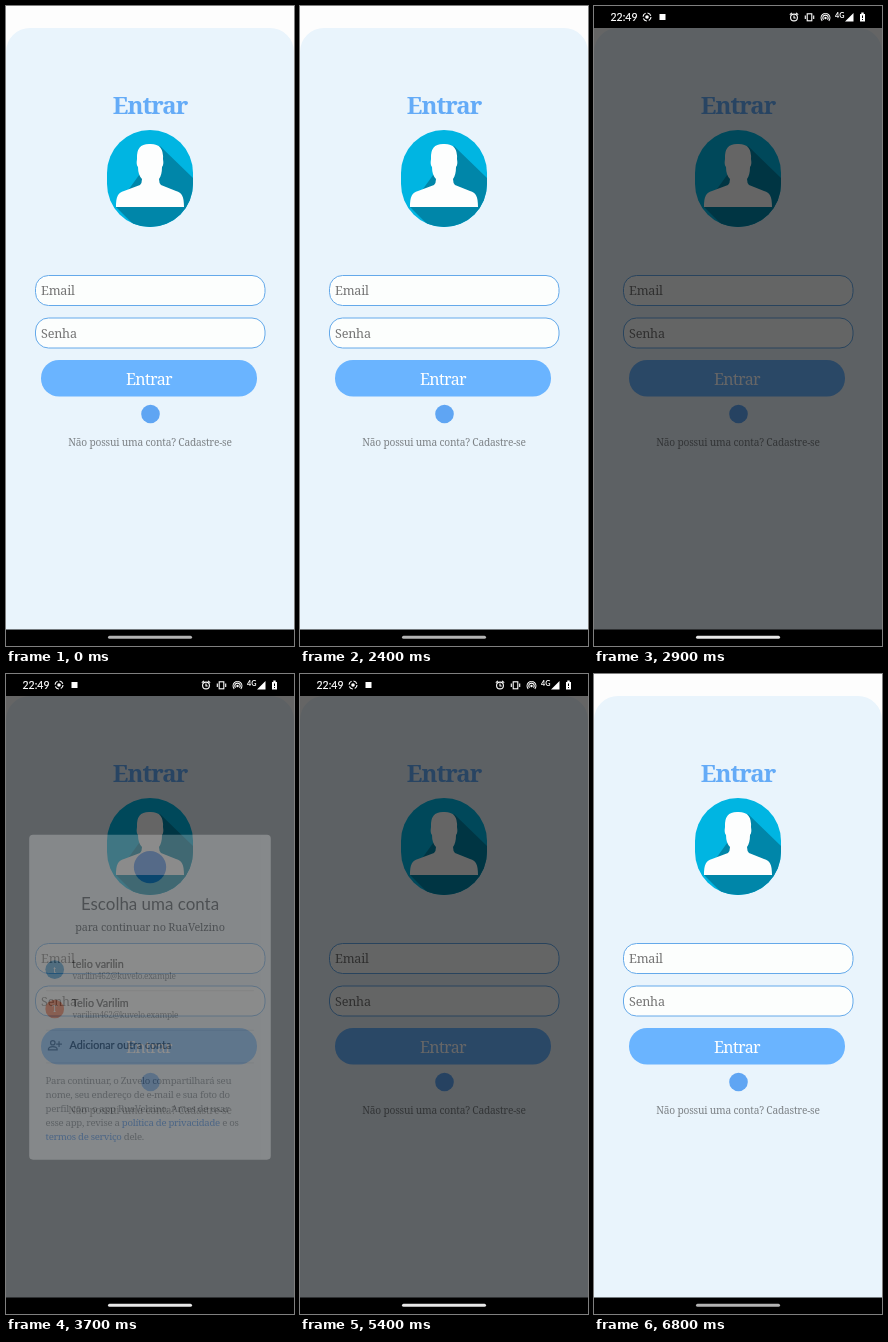
An HTML page that plays this animation: 288x640 px, repeating every 8000 ms.

```html
<!DOCTYPE html>
<html lang="pt-BR">
<head>
<meta charset="utf-8">
<title>Entrar</title>
<style>
  html, body { margin: 0; width: 100%; height: 100%; overflow: hidden; background: #fdfdfd; }
  svg { display: block; width: 288px; height: 640px; }
  .slab { font-family: "Noto Serif", serif; }
  .sans { font-family: Lato, sans-serif; }
  .mid { text-anchor: middle; }
  .title { font-size: 24px; font-weight: 700; letter-spacing: -1px; fill: #64abf7; }
  .label { font-size: 12.6px; letter-spacing: -.2px; fill: #757575; }
  .button { font-size: 16px; letter-spacing: -.6px; fill: #fff; }
  .signup { font-size: 10.2px; letter-spacing: -.2px; fill: #7d8286; }
  .head { font-size: 17.6px; fill: #202124; }
  .sub { font-size: 11.3px; letter-spacing: -.2px; fill: #202124; }
  .name { font-size: 11.2px; fill: #202124; stroke: #202124; stroke-width: .25px; }
  .mail { font-size: 8.6px; letter-spacing: -.3px; fill: #5f6368; }
  .body { font-size: 10px; letter-spacing: -.3px; fill: #5f6368; }
  .link { fill: #1a73e8; }
</style>
</head>
<body>
<svg viewBox="0 0 288 640">
  <defs>
    <clipPath id="badge"><rect x="101" y="124" width="86" height="97" rx="43"/></clipPath>
  </defs>

  <rect width="288" height="640" fill="#fdfdfd"/>
  <path d="M0 624V46A24 24 0 0 1 24 22H264A24 24 0 0 1 288 46V624Z" fill="#e9f4fc"/>

  <text class="slab mid title" x="144" y="108">Entrar</text>

  <g clip-path="url(#badge)">
    <rect x="101" y="124" width="86" height="97" fill="#00b5e2"/>
    <path d="M154 140L190 175V224H133L110 201Z" fill="#0086a9"/>
    <path d="M110 201C110 190 112 187 118 185L134 179Q136 177 136 173Q132 169 132 161Q130 159 131 153
      Q130 138 143 138Q158 137 157 153Q158 159 156 161Q156 169 153 173Q153 177 155 179L170 185C176 187 178 190 178 201Z" fill="#fdfefe"/>
  </g>

  <g fill="#fcfefd" stroke="#64a9ea">
    <rect x="29.5" y="269.5" width="229.5" height="30" rx="13"/>
    <rect x="29.5" y="312" width="229.5" height="30" rx="13"/>
  </g>
  <text class="slab label" x="35" y="289">Email</text>
  <text class="slab label" x="35" y="331.5">Senha</text>

  <rect x="35" y="354" width="216" height="36.5" rx="18" fill="#6ab4ff"/>
  <text class="slab mid button" x="143" y="378.5">Entrar</text>
  <circle cx="144.5" cy="408" r="9.3" fill="#5fa5f3"/>
  <text class="slab mid signup" x="144" y="440">Não possui uma conta? Cadastre-se</text>

  <rect id="dim" y="22" width="288" height="602" opacity="0"/>

  <g id="dialog" opacity="0">
    <rect x="18.5" y="154.5" width="251" height="337.5" rx="4" fill="#fdfefd"/>
    <circle cx="144" cy="188" r="16.8" fill="#2879ef"/>
    <text class="sans mid head" x="144" y="233">Escolha uma conta</text>
    <text class="slab mid sub" x="144" y="254.5">para continuar no RuaVelzino</text>
    <g id="accounts"></g>
    <path d="M36 316.5H252M36 357.5H252M36 391.5H252" stroke="#dcdedf"/>
    <g fill="none" stroke="#5f6368" stroke-width="1.3">
      <circle cx="43" cy="370.5" r="2.3"/>
      <path d="M38.5 378V377Q39 374.5 43 374.5T47.5 377V378ZM49.5 369V375M46.5 372H52.5"/>
    </g>
    <text class="sans name" x="60.5" y="377">Adicionar outra conta</text>
    <g class="slab body">
      <text x="35.5" y="413">Para continuar, o Zuvelo compartilhará seu</text>
      <text x="35.5" y="427.7">nome, seu endereço de e-mail e sua foto do</text>
      <text x="35.5" y="442.4">perfil com o app RuaVelzino. Antes de usar</text>
      <text x="35.5" y="457.1">esse app, revise a <tspan class="link">política de privacidade</tspan> e os</text>
      <text x="35.5" y="471.8"><tspan class="link">termos de serviço</tspan> dele.</text>
    </g>
  </g>

  <g id="status" visibility="hidden">
    <rect width="288" height="22"/>
    <g fill="#fff">
      <text class="sans" x="16.5" y="15" font-size="10.5" stroke="#fff" stroke-width=".2">22:49</text>
      <circle cx="53" cy="11" r="1.8"/>
      <rect x="65.5" y="8" width="6" height="6"/>
      <circle cx="231.5" cy="12" r="1.2"/>
      <text class="sans" x="241" y="11.5" font-size="7.2" font-weight="700">4G</text>
      <path d="M251 15.5L259.5 7V15.5ZM266 8H267.3V6.5H269.7V8H271V15.5H266Z"/>
    </g>
    <path d="M268.5 9.5V12M268.5 13V14" stroke="#000"/>
    <g fill="none" stroke="#fff" stroke-width="1.1">
      <circle cx="53" cy="11" r="4" stroke-dasharray="4.3 2"/>
      <circle cx="200" cy="11.5" r="3.4"/>
      <path d="M200 9.5V12H201.7M195.8 8.7L198 6.8M204.2 8.7L202 6.8"/>
      <rect x="213.2" y="7.8" width="4.6" height="7"/>
      <path d="M211.3 9.5V13M219.7 9.5V13"/>
      <path d="M229.6 13.7A2.7 2.7 0 1 1 233.4 13.7M228.2 14.8A4.4 4.4 0 1 1 234.8 14.8"/>
    </g>
  </g>

  <rect y="623.5" width="288" height="16.5"/>
  <rect id="handle" x="102" y="629.7" width="84" height="3" rx="1.5" fill="#b4b4b4"/>
</svg>
<script>
  const LOOP = 8000, TICK = 100;
  const $ = id => document.getElementById(id);
  const [dim, dialog, status, handle] = ['dim', 'dialog', 'status', 'handle'].map($);

  const account = (y, color, name, mail) => `
    <circle cx="45" cy="${y}" r="9.7" fill="${color}"/>
    <text class="slab mid" x="45" y="${y + 3.2}" font-size="9" fill="#fff">${name[0]}</text>
    <text class="sans name" x="63" y="${y - 2}">${name}</text>
    <text class="slab mail" x="63.5" y="${y + 9.5}">${mail}</text>`;
  $('accounts').innerHTML =
    account(294.5, '#1686cf', 'telio varilin', 'varilin462@kuvelo.example') +
    account(335.5, '#f4511e', 'Telio Varilim', 'varilim462@kuvelo.example');

  // [time, value] steps, linear in between
  const dimKeys = [[2600, 0], [2700, .11], [2800, .38], [2900, .6], [6000, .6], [6100, .52], [6200, .32], [6300, .12], [6400, 0]];
  const cardKeys = [[3600, 0], [3700, .25], [3800, .7], [3900, .95], [4000, 1], [5100, 1], [5200, .65], [5300, .2], [5400, 0]];

  function valueAt(keys, t) {
    const i = keys.findIndex(k => k[0] > t);
    if (i < 0) return keys[keys.length - 1][1];
    if (i === 0) return keys[0][1];
    const [t0, a] = keys[i - 1], [t1, b] = keys[i];
    return a + (b - a) * (t - t0) / (t1 - t0);
  }

  function draw(now) {
    // the screen refreshes ten times a second
    const t = Math.floor(now % LOOP / TICK) * TICK;
    const show = valueAt(cardKeys, t);
    const scale = t < 4000 ? .95 + .05 * show : 1;
    const dark = t >= 2700 && t < 6200;
    dim.setAttribute('opacity', valueAt(dimKeys, t));
    dialog.setAttribute('opacity', show);
    dialog.setAttribute('transform', `translate(144 323) scale(${scale}) translate(-144 -323)`);
    status.setAttribute('visibility', dark ? 'visible' : 'hidden');
    handle.setAttribute('fill', dark ? '#e8e8e8' : '#b4b4b4');
  }

  let start;
  function frame(now) {
    start ??= now;
    draw(now - start);
    requestAnimationFrame(frame);
  }
  draw(0);
  requestAnimationFrame(frame);
</script>
</body>
</html>
```
